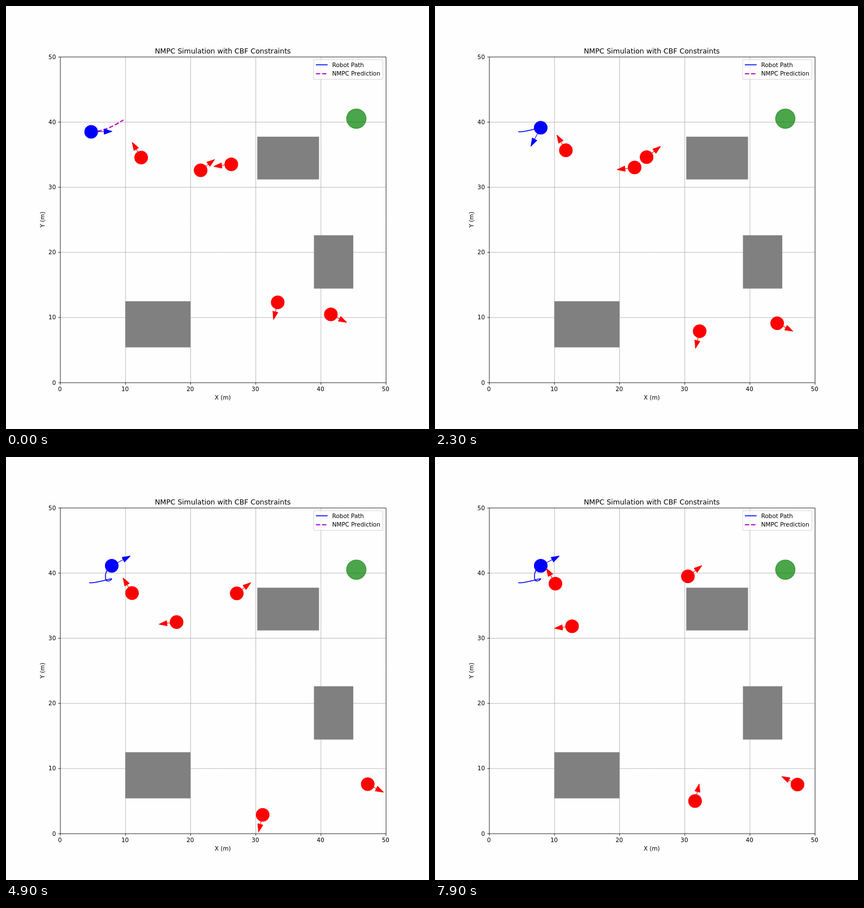
Animation of 748x748 px, one loop 8 s. Source, as an HTML page with a canvas:

```html
<!DOCTYPE html>
<html lang="en">
<head>
<meta charset="utf-8">
<title>NMPC Simulation</title>
<style>
  html, body { margin: 0; width: 100%; height: 100%; overflow: hidden; background: #fefefe; }
  canvas { display: block; }
</style>
</head>
<body>
<canvas id="stage" width="748" height="748"></canvas>
<script>
// The figure is laid out on a 1000 x 1000 sheet at 100 dpi and scaled to the stage.
const ctx = document.getElementById('stage').getContext('2d');
const PT = 100 / 72, UNIT = 15.4, SIZE = 50;
const STEP = 100, STEPS = 80;
const px = m => 127.5 + m * UNIT;
const py = m => 890 - m * UNIT;
const snap = v => Math.round(v) + 0.5;
const rad = deg => deg * Math.PI / 180;

// start and velocity in metres per step
const obstacles = [
  { x: 12.47, y: 34.53, vx: -0.0286, vy: 0.0484 },
  { x: 21.6, y: 32.58, vx: 0.1132, vy: 0.0873 },
  { x: 26.31, y: 33.49, vx: -0.1715, vy: -0.0212 },
  { x: 33.43, y: 12.3, vx: -0.047, vy: -0.1927 },
  { x: 41.59, y: 10.45, vx: 0.1155, vy: -0.0588 }
];

// step, heading in degrees, speed until the next row
const steering = [
  [-1, -8, 0.293], [0, 1, 0.293], [2, 10, 0.293], [8, 15, 0.293],
  [11, 10, 0], [23, -118, 0.105], [30, -181, 0.049], [38, -254, 0.226], [49, -332, 0]
];

function steer(k) {
  const i = steering.findLastIndex(row => row[0] <= k);
  const [k0, h0, speed] = steering[i];
  const [k1, h1] = steering[i + 1] || [k0 + 1, h0];
  return { heading: h0 + (h1 - h0) * Math.min(1, (k - k0) / (k1 - k0)), speed };
}

// Follows a heading from a point, in equal short moves.
function walk(x, y, moves, next) {
  const points = [[x, y]];
  for (let i = 0; i < moves; i++) {
    const [heading, length] = next(i + 0.5);
    x += length * Math.cos(rad(heading));
    y += length * Math.sin(rad(heading));
    points.push([x, y]);
  }
  return points;
}

const FINE = 4;
const route = walk(4.5, 38.5, STEPS * FINE, i => {
  const { heading, speed } = steer(i / FINE - 1);
  return [heading, speed / FINE];
});

function prediction(x, y, heading, k) {
  return walk(x, y, 24, i => {
    const s = i / 24;
    const bent = k < 9
      ? heading + (30 - 2 * k) * Math.sin(Math.PI / 2 * s * (1 + k / 6))
      : 22 + (heading + 338) * Math.exp(-4 * s);
    return [bent, 5.35 / 24];
  });
}

// Obstacles turn back when the next step would cross a wall.
function obstacleAt({ x, y, vx, vy }, k) {
  const inside = v => v >= 1 && v <= SIZE - 1;
  for (let i = 0; i < k; i++) {
    if (inside(x + vx) && inside(y + vy)) {
      x += vx;
      y += vy;
    } else {
      vx = -vx;
      vy = -vy;
    }
  }
  return { x, y, angle: Math.atan2(vy, vx) };
}

function line(points, color, width, dash = []) {
  ctx.beginPath();
  points.forEach(([x, y]) => ctx.lineTo(x, y));
  ctx.strokeStyle = color;
  ctx.lineWidth = width * PT;
  ctx.setLineDash(dash.map(d => d * PT));
  ctx.stroke();
  ctx.setLineDash([]);
}

const plot = (points, ...style) => line(points.map(([x, y]) => [px(x), py(y)]), ...style);

function text(str, x, y, align = 'center', size = 10) {
  ctx.font = size * PT + 'px "DejaVu Sans", sans-serif';
  ctx.textAlign = align;
  ctx.fillStyle = '#000';
  ctx.fillText(str, x, y);
}

function disc(x, y, r, color) {
  ctx.beginPath();
  ctx.arc(px(x), py(y), r * UNIT, 0, 7);
  ctx.fillStyle = ctx.strokeStyle = color;
  ctx.lineWidth = PT;
  ctx.fill();
  ctx.stroke();
}

function box(x, y, w, h) {
  const left = Math.round(px(x)), top = Math.round(py(y + h));
  ctx.fillStyle = '#808080';
  ctx.fillRect(left, top, Math.round(px(x + w)) - left, Math.round(py(y)) - top);
}

function agent(x, y, angle, length, color) {
  const tip = length * UNIT, neck = tip - 1.2 * UNIT, half = 0.4 * UNIT;
  ctx.save();
  ctx.translate(px(x), py(y));
  ctx.rotate(-angle);
  line([[0, 0], [neck, 0]], color, 1);
  line([[neck, -half], [tip, 0], [neck, half], [neck, -half]], color, 1);
  ctx.fillStyle = color;
  ctx.fill();
  ctx.restore();
  disc(x, y, 1, color);
}

function drawGrid() {
  for (let m = 10; m < SIZE; m += 10) {
    const x = snap(px(m)), y = snap(py(m));
    line([[x, py(0)], [x, py(SIZE)]], '#b0b0b0', 0.8);
    line([[px(0), y], [px(SIZE), y]], '#b0b0b0', 0.8);
  }
}

function drawAxes() {
  const left = snap(px(0)), right = snap(px(SIZE)), top = snap(py(SIZE)), bottom = snap(py(0));
  ctx.strokeStyle = '#000';
  ctx.lineWidth = 0.8 * PT;
  ctx.strokeRect(left, top, right - left, bottom - top);
  for (let m = 0; m <= SIZE; m += 10) {
    const x = snap(px(m)), y = snap(py(m));
    line([[x, bottom], [x, bottom + 3.5 * PT]], '#000', 0.8);
    line([[left - 3.5 * PT, y], [left, y]], '#000', 0.8);
    text(m, px(m), 911);
    text(m, 118, py(m) + 5.3, 'right');
  }
  text('X (m)', 512.5, 930.5);
  text('NMPC Simulation with CBF Constraints', 512.5, 111.7, 'center', 12);
  ctx.save();
  ctx.translate(91, 505);
  ctx.rotate(-Math.PI / 2);
  text('Y (m)', 0, 0);
  ctx.restore();
}

function drawLegend() {
  ctx.beginPath();
  ctx.roundRect(727.3, 127, 163.3, 46.4, 2.8);
  ctx.fillStyle = 'rgba(255,255,255,.8)';
  ctx.fill();
  ctx.strokeStyle = 'rgba(204,204,204,.8)';
  ctx.lineWidth = PT;
  ctx.stroke();
  line([[732.5, 139], [760.3, 139]], '#00f', 1.5);
  line([[732.5, 160], [760.3, 160]], '#bf00bf', 2, [7.4, 3.2]);
  text('Robot Path', 771, 144, 'left');
  text('NMPC Prediction', 771, 164.3, 'left');
}

function drawRobot(k) {
  const trail = route.slice(0, (k + 1) * FINE + 1);
  const [x, y] = trail[trail.length - 1];
  const { heading } = steer(k);
  plot(trail, '#00f', 1.5);
  if (k < 9 || (k > 27 && k < 49)) {
    plot(prediction(x, y, heading, k), '#bf00bf', 2, [7.4, 3.2]);
  }
  agent(x, y, rad(heading), 3.2, '#00f');
}

function draw(k) {
  ctx.setTransform(0.748, 0, 0, 0.748, 0, 0);
  ctx.lineJoin = 'round';
  ctx.fillStyle = '#fefefe';
  ctx.fillRect(0, 0, 1000, 1000);
  drawGrid();
  ctx.save();
  ctx.beginPath();
  ctx.rect(px(0), py(SIZE), SIZE * UNIT, SIZE * UNIT);
  ctx.clip();
  box(10, 5.4, 10, 7.1);
  box(30.27, 31.2, 9.5, 6.5);
  box(39, 14.4, 6, 8.2);
  disc(45.5, 40.5, 1.5, 'rgba(0,128,0,.7)');
  drawRobot(k);
  for (const o of obstacles) {
    const { x, y, angle } = obstacleAt(o, k);
    agent(x, y, angle, 2.7, '#f00');
  }
  ctx.restore();
  drawAxes();
  drawLegend();
}

const start = performance.now();
function tick() {
  draw(Math.floor((performance.now() - start) / STEP) % STEPS);
  requestAnimationFrame(tick);
}
tick();
</script>
</body>
</html>
```
